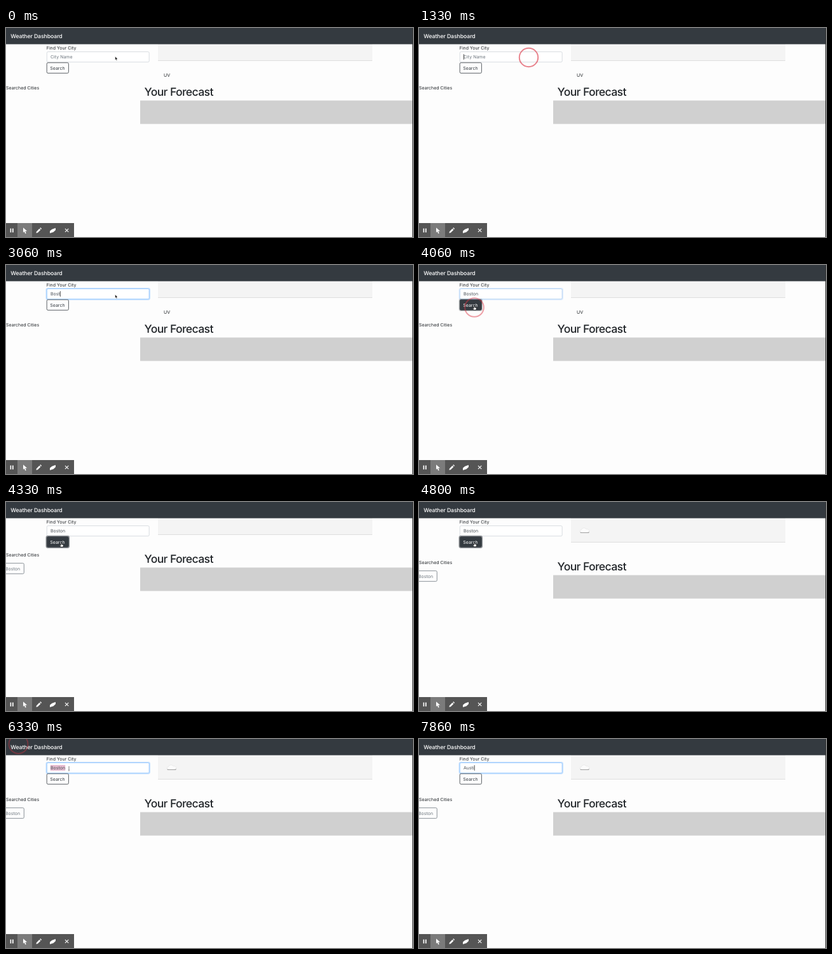
These frames come from a looping animation (640x330 px, 8 s). An HTML page:

```html
<!DOCTYPE html>
<html lang="en">
<head>
<meta charset="utf-8">
<title>Weather Dashboard</title>
<style>
  html, body { margin: 0; width: 100%; height: 100%; overflow: hidden; background: #fdfdfd; }
  svg { display: block; width: 640px; height: 330px; }
  text {
    font: 400 7px Inter, Roboto, sans-serif;
    font-optical-sizing: none;
    text-rendering: geometricPrecision;
    fill: #212529;
    white-space: pre;
  }
  .brand { font-size: 8.75px; font-weight: 500; letter-spacing: -.013em; fill: #fff; }
  .title { font-size: 17.5px; font-weight: 500; letter-spacing: -.033em; }
  .muted { fill: #6c757d; }
  .icon { fill: #fff; }
</style>
</head>
<body>
<svg viewBox="0 0 640 330">
  <rect width="640" height="330" fill="#fdfdfd"/>

  <!-- weather card -->
  <rect x="239" y="25" width="337" id="card" fill="#f4f4f4"/>
  <rect x="239" width="337" height="1" id="cardEdge" fill="#dedede"/>
  <g id="cloud">
    <path d="M253.5 46.5h14v1.2q0 1.3-1.4 1.3h-11.2q-1.4 0-1.4-1.3z" fill="#8f8f8f"/>
    <path d="M255.3 48q-2.3 0-2.3-2 0-2 2.5-2.2 .6-2.9 3.8-2.9 2.7 0 3.5 2 4.7-.5 4.9 2.7 .1 2.4-2.4 2.4z" fill="#fcfcfc" stroke="#dcdcdc" stroke-width=".5"/>
  </g>
  <text x="248" y="76.9" id="uv">UV</text>

  <!-- content below the form -->
  <g id="flow">
    <text x="0" y="97">Searched Cities</text>
    <text class="title" x="217.6" y="106.8">Your Forecast</text>
    <rect x="211" y="114.5" width="428" height="37" fill="#d0d0d0"/>
    <g id="recent">
      <rect x="-7.5" y="107.7" width="35.8" height="16.6" rx="1.8" fill="#fdfdfd" stroke="#6c757d" stroke-width=".8"/>
      <text class="muted" x="-1" y="118.6">Boston</text>
    </g>
  </g>

  <!-- navigation -->
  <rect width="640" height="25.6" fill="#343a40"/>
  <text class="brand" x="7.2" y="16.2">Weather Dashboard</text>

  <!-- search form -->
  <text x="63.8" y="34">Find Your City</text>
  <rect x="63.3" y="36.8" width="162.8" height="17.8" rx="2.3" id="glow" fill="none" stroke="#80bdff" stroke-opacity=".45" stroke-width="1.6"/>
  <rect x="64.3" y="37.6" width="160.8" height="16.2" rx="1.8" id="field" fill="#fff" stroke-width=".8"/>
  <rect x="69.8" y="41" height="9" id="mark" fill="#e6bcd0"/>
  <text x="70" y="48.3" id="entry"></text>
  <rect y="41.3" width=".8" height="8.6" id="caret" fill="#222"/>
  <rect x="63.3" y="53.8" width="36" height="18.4" rx="2.4" id="ring" fill="none" stroke="#343a40" stroke-opacity=".55" stroke-width="1.5"/>
  <rect x="64.2" y="54.8" width="34.2" height="16.5" rx="1.8" id="button" stroke="#343a40" stroke-width=".8"/>
  <text x="69.3" y="65.7" id="label">Search</text>

  <rect x="639" width="1" height="330" fill="#333"/>

  <!-- recorder toolbar -->
  <rect y="308" width="107" height="22" fill="#555"/>
  <rect x="18" y="308" width="23" height="22" fill="#7b7b7b"/>
  <g class="icon">
    <path d="M6.6 316.4h1.7v6.4h-1.7zM10 316.4h1.7v6.4h-1.7z"/>
    <path d="M27 315.2l6.2 5.5h-3l1.6 3.3-1.5.7-1.5-3.4-1.8 1.8z"/>
    <path d="M47.4 323.8l.5-2.4 4.6-4.6 1.9 1.9-4.6 4.6zM53.2 316.1l1-1 1.9 1.9-1 1z"/>
    <path d="M69 320.4l3.4-2.7 5.6-2v3.4l-3.4 3.1-5.6 1.9z"/>
    <path d="M92.9 316.8l5.4 5.4m0-5.4l-5.4 5.4" stroke="#fff" stroke-width="1.1"/>
  </g>

  <!-- pointer -->
  <circle id="pulse" fill="none" stroke="#dc3545" stroke-width="2"/>
  <path id="arrow" d="M0 0v5.4l1.2-1 .9 2 .9-.4-.9-1.9h1.7z" fill="#111" stroke="#fff" stroke-width=".4"/>
  <path id="hand" d="M-.8-2.3q.7-.6 1.2 0v2.2l2.2.5q.7.3.6 1l-.5 2.6h-3.4l-2-2.6q.1-.9 1.9.2z" fill="#fff" stroke="#111" stroke-width=".6"/>
  <path id="beam" d="M-.9-3.3q.9 0 .9.7v5.2q0 .7-.9.7M.9-3.3q-.9 0-.9.7M0 2.6q0 .7.9.7M-.7.8h1.4" fill="none" stroke="#444" stroke-width=".6"/>
</svg>
<script>
  const LOOP = 8000, STEP = 200 / 3, FADE = 267;
  const ui = {};
  document.querySelectorAll('[id]').forEach(el => ui[el.id] = el);

  // [time, text in the field]
  const typing = [
    [0, ''], [2530, 'B'], [2660, 'Bo'], [2860, 'Bos'], [3000, 'Bost'], [3200, 'Bosto'], [3390, 'Boston'],
    [6930, 'A'], [7060, 'Au'], [7260, 'Aus'], [7400, 'Aust'], [7600, 'Austi']
  ];
  // [time, x, y]
  const clicks = [[1330, 172.5, 46.5], [4000, 87, 67], [5530, 99, 47], [6000, 99, 47], [6220, 19.5, 8]];
  // [time, vertical shift of the content]
  const shifts = [[0, 0], [4130, -11], [4390, 1]];
  // [time, x, y]
  const path = [
    [0, 171.7, 45], [2600, 171.7, 46.7], [3600, 171.7, 46.7], [3930, 87, 67],
    [4740, 87, 67], [5400, 99, 47], [LOOP, 99, 47]
  ];

  const clamp = v => Math.max(0, Math.min(1, v));
  const ramp = (t, from) => clamp((t - from) / 150);
  const ease = v => v * v * (3 - 2 * v);
  const within = (t, a, b) => t >= a && t < b;
  const latest = (list, t) => list.filter(row => row[0] <= t).pop();
  const show = (el, on) => el.setAttribute('visibility', on ? 'visible' : 'hidden');
  const set = (el, attrs) => { for (const k in attrs) el.setAttribute(k, attrs[k]); };
  const mix = (a, b, v) => `rgb(${a.map((c, i) => Math.round(c + (b[i] - c) * v))})`;

  const DARK = [52, 58, 64], LIGHT = [253, 253, 253];

  function pointerAt(t) {
    const i = Math.max(1, path.findIndex(p => p[0] > t));
    const [a, b] = [path[i - 1], path[i]];
    const v = ease(clamp((t - a[0]) / (b[0] - a[0])));
    return [a[1] + (b[1] - a[1]) * v, a[2] + (b[2] - a[2]) * v];
  }

  function drawField(t) {
    const focus = ramp(t, 1380) - ramp(t, 4000) + ramp(t, 5600);
    const text = latest(typing, t)[1];
    const marked = within(t, 6060, 6930);
    ui.glow.setAttribute('opacity', focus);
    ui.field.setAttribute('stroke', mix([206, 212, 218], [128, 189, 255], focus));
    ui.entry.textContent = text || 'City Name';
    ui.entry.style.fill = text ? '#495057' : '#6c757d';
    const width = text ? ui.entry.getComputedTextLength() : 0;
    show(ui.mark, marked);
    ui.mark.setAttribute('width', width + .4);
    ui.caret.setAttribute('x', 70.1 + width);
    show(ui.caret, within(t, 1330, 1860) || within(t, 2390, 3860) || (t >= 5600 && !marked));
  }

  function drawButton(t) {
    const hover = ramp(t, 3860) - ramp(t, 5000);
    ui.ring.setAttribute('opacity', ramp(t, 4000) - ramp(t, 5600));
    ui.button.setAttribute('fill', mix(LIGHT, DARK, hover));
    ui.label.style.fill = mix(DARK, LIGHT, hover);
  }

  function drawContent(t) {
    const loaded = t >= 4390;
    const bottom = loaded ? 64 : 52;
    ui.flow.setAttribute('transform', `translate(0 ${latest(shifts, t)[1]})`);
    ui.card.setAttribute('height', bottom - 25);
    ui.cardEdge.setAttribute('y', bottom - 1);
    show(ui.cloud, loaded);
    show(ui.uv, t < 4130);
    show(ui.recent, t >= 4130);
  }

  function drawPointer(t) {
    const [x, y] = pointerAt(t);
    const overButton = within(t, 3860, 5000);
    const kind = t < 460 || within(t, 2600, 3860) ? 'arrow'
      : overButton ? 'hand'
      : within(t, 5000, 7860) ? 'beam' : '';
    for (const name of ['arrow', 'hand', 'beam']) {
      show(ui[name], name === kind);
      ui[name].setAttribute('transform', `translate(${x} ${y})`);
    }
    const click = latest(clicks, t);
    const age = click ? (t - click[0]) / FADE : 1;
    show(ui.pulse, age < 1);
    if (age < 1) set(ui.pulse, { cx: click[1], cy: click[2], r: 14.7 + age * .6, opacity: .62 * (1 - age) });
  }

  function render(now) {
    const t = Math.floor((now % LOOP + 7) / STEP) * STEP;
    drawField(t);
    drawButton(t);
    drawContent(t);
    drawPointer(t);
  }

  const start = performance.now();
  function tick() {
    render(performance.now() - start);
    requestAnimationFrame(tick);
  }
  tick();
</script>
</body>
</html>
```
